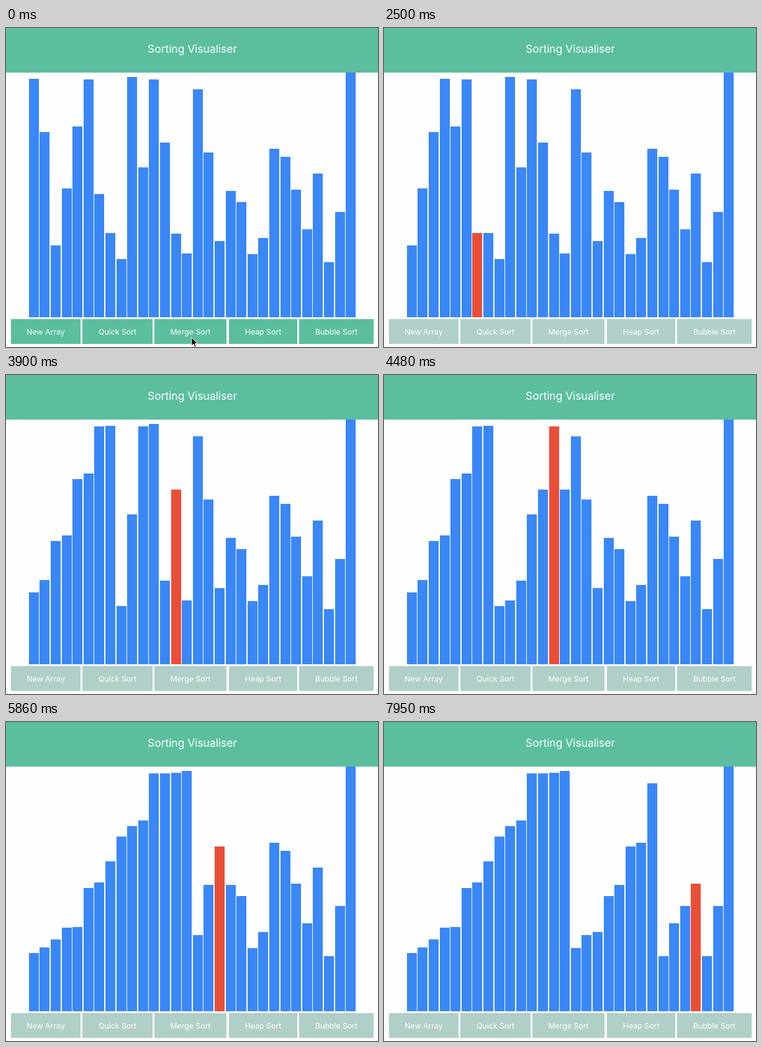
Write an HTML page with a canvas that moves like this. It is 599 px wide and 515 px high and loops after 8 s.

```html
<!DOCTYPE html>
<html lang="en">
<head>
<meta charset="utf-8">
<title>Sorting Visualiser</title>
<style>
  html, body { margin: 0; width: 100%; height: 100%; overflow: hidden; background: #fff; }
  canvas { display: block; }
</style>
</head>
<body>
<canvas id="stage" width="599" height="515"></canvas>
<script>
const ctx = document.getElementById('stage').getContext('2d');
const LOOP = 8000;
const PRESS_START = 840;
const SORT_START = 1910;
const STEP = 61.17;
const CURSOR_GONE = 2200;
const BASE = 467;
const GREEN = '#5bbe9f', PRESSED = '#53b194', DISABLED = '#b0cfc9';
const BLUE = '#3a87f8', RED = '#ea4e37';

// The unsorted array, as bar heights
const heights = [
  385, 299, 116, 208, 308, 384, 199, 136, 94, 388, 242, 384, 282, 135, 103,
  368, 266, 123, 204, 186, 102, 128, 272, 259, 206, 142, 232, 89, 170, 395
];

const buttonWidths = {
  'New Array': 112,
  'Quick Sort': 112.75,
  'Merge Sort': 116,
  'Heap Sort': 110,
  'Bubble Sort': 120
};

const pointer = new Path2D('M0 0V13.6L3.1 10.7L5.2 15.7L7.4 14.8L5.3 9.9H9.5Z');

// Every write of a merge sort, in order, as [index, height]
function recordMergeSort(source) {
  const values = source.slice();
  const writes = [];
  function sort(lo, hi) {
    if (lo >= hi) return;
    const mid = (lo + hi) >> 1;
    sort(lo, mid);
    sort(mid + 1, hi);
    const left = values.slice(lo, mid + 1);
    const right = values.slice(mid + 1, hi + 1);
    for (let i = lo; i <= hi; i++) {
      const takeLeft = !right.length || left[0] <= right[0];
      values[i] = (takeLeft ? left : right).shift();
      writes.push([i, values[i]]);
    }
  }
  sort(0, values.length - 1);
  return writes;
}

const writes = recordMergeSort(heights);

function drawText(text, x, y, size) {
  ctx.font = `400 ${size}px Inter, sans-serif`;
  ctx.textAlign = 'center';
  ctx.fillStyle = '#fff';
  ctx.fillText(text, x, y);
}

function drawBars(t) {
  const count = t < SORT_START ? 0 : Math.round((t - SORT_START) / STEP) + 1;
  const bars = heights.slice();
  let active = -1;
  for (const [index, height] of writes.slice(0, count)) {
    bars[index] = height;
    active = index;
  }
  bars.forEach((height, i) => {
    ctx.fillStyle = i === active ? RED : BLUE;
    ctx.fillRect(Math.round(36.85 + 17.6 * i), BASE - height, 16, height);
  });
}

function buttonColor(label, t) {
  if (t >= SORT_START) return DISABLED;
  return label === 'Merge Sort' && t >= PRESS_START ? PRESSED : GREEN;
}

function drawButtons(t) {
  let x = 8;
  for (const [label, width] of Object.entries(buttonWidths)) {
    const left = Math.round(x), right = Math.round(x + width);
    ctx.fillStyle = buttonColor(label, t);
    ctx.fillRect(left, 470, right - left, 40);
    drawText(label, (left + right) / 2, 495, 12.3);
    x += width + 3.25;
  }
}

function drawCursor(t) {
  if (t >= CURSOR_GONE) return;
  const y = t < 120 ? 499 : t < 300 ? 498 : 497;
  ctx.save();
  ctx.translate(298.8, y + 0.5);
  ctx.fillStyle = '#000';
  ctx.fill(pointer);
  ctx.strokeStyle = '#fff';
  ctx.stroke(pointer);
  ctx.restore();
}

function draw(t) {
  ctx.fillStyle = '#fefefe';
  ctx.fillRect(0, 0, 599, 515);
  drawBars(t);
  ctx.fillStyle = GREEN;
  ctx.fillRect(0, 0, 599, 72);
  drawText('Sorting Visualiser', 300, 40, 17.4);
  drawButtons(t);
  drawCursor(t);
}

const start = performance.now();
function tick() {
  draw((performance.now() - start) % LOOP);
  requestAnimationFrame(tick);
}
tick();
</script>
</body>
</html>
```
